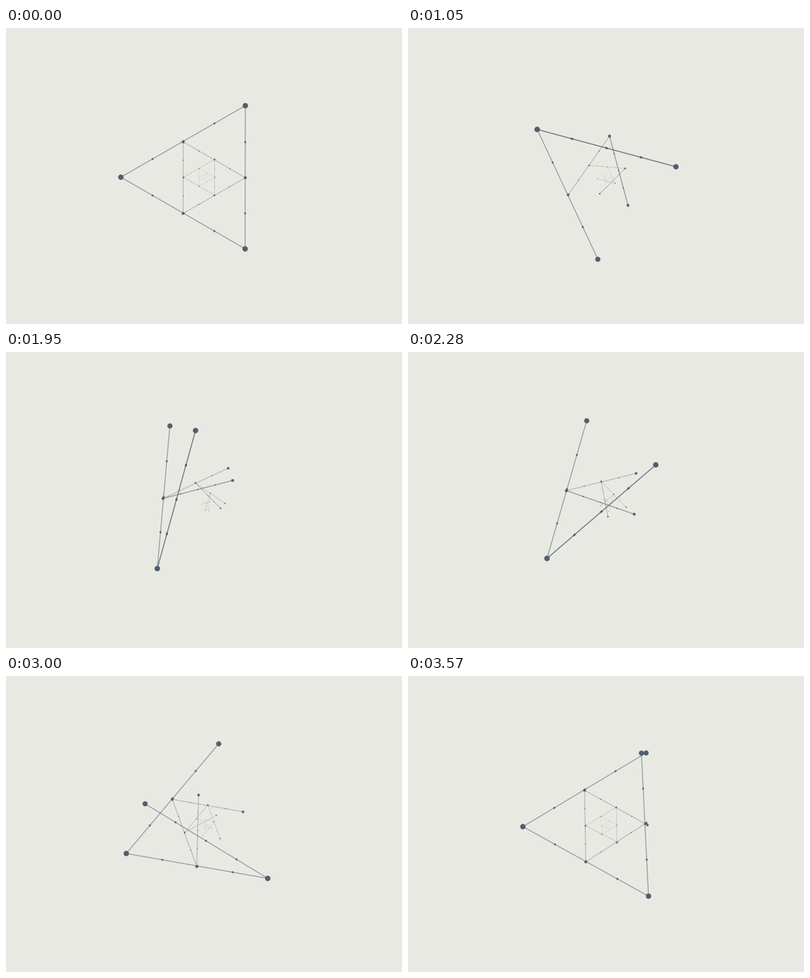
Animation of 800 by 600 pixels, one loop 3600 ms. Source, as an HTML page:

```html
<!DOCTYPE html>
<html lang="en">
<head>
<meta charset="utf-8">
<title>Folding triangles</title>
<style>
  html, body { margin: 0; width: 100%; height: 100%; overflow: hidden; background: #e9e9e3; }
  svg { display: block; width: 800px; height: 600px; }
  line { stroke: #505e6d; stroke-width: 1.2; }
  circle { fill: #505e6d; }
  .spin, .base, .arm, .tip { transform-origin: 0 0; animation: 3600ms linear infinite; }
  .spin { animation-name: spin; }
  .base { animation-name: base; }
  .arm { animation-name: arm; }
  .tip { animation-name: tip; }

  /* Halfway all rods are stacked, and the hinge moves to the other end. */
  @keyframes spin {
    0% { transform: rotate(0deg); }
    49.999% { transform: rotate(60deg); }
    50% { transform: rotate(-60deg); }
    100% { transform: rotate(0deg); }
  }
  @keyframes base {
    0%, 49.999% { transform: rotate(30deg); }
    50%, 100% { transform: rotate(-30deg); }
  }
  @keyframes arm {
    0%, 25% { transform: rotate(-30deg); }
    49.999% { transform: rotate(30deg); }
    50% { transform: rotate(-30deg); }
    74.1667%, 100% { transform: rotate(30deg); }
  }
  @keyframes tip {
    0% { transform: rotate(120deg); }
    25%, 74.1667% { transform: rotate(180deg); }
    100% { transform: rotate(240deg); }
  }
</style>
</head>
<body>
<svg id="stage" viewBox="0 0 800 600"></svg>
<script>
  const LEVELS = 7;
  const LENGTH = 290.3;

  const dot = (at, r) => `<circle cx="${LENGTH * at}" r="${r}"/>`;
  const rod = `<line x2="${LENGTH}"/>` + dot(0, 5.2) + dot(1, 5.2) +
    [0.255, 0.504, 0.752].map(at => dot(at, 2.1)).join('');

  const triangle = `
    <g class="spin"><g transform="translate(-168 2.5)">
      <g class="base">${rod}</g>
      <g class="arm">${rod}
        <g transform="translate(${LENGTH} 0)"><g class="tip">${rod}</g></g>
      </g>
    </g></g>`;

  // Each level is half as large and turned by a further 60 degrees.
  const level = i => {
    const centre = i ? '401 303' : '400 300';
    return `<g transform="translate(${centre}) rotate(${60 * i}) scale(${0.5 ** i})">${triangle}</g>`;
  };

  document.getElementById('stage').innerHTML =
    Array.from({ length: LEVELS }, (_, i) => level(i)).join('');
</script>
</body>
</html>
```
